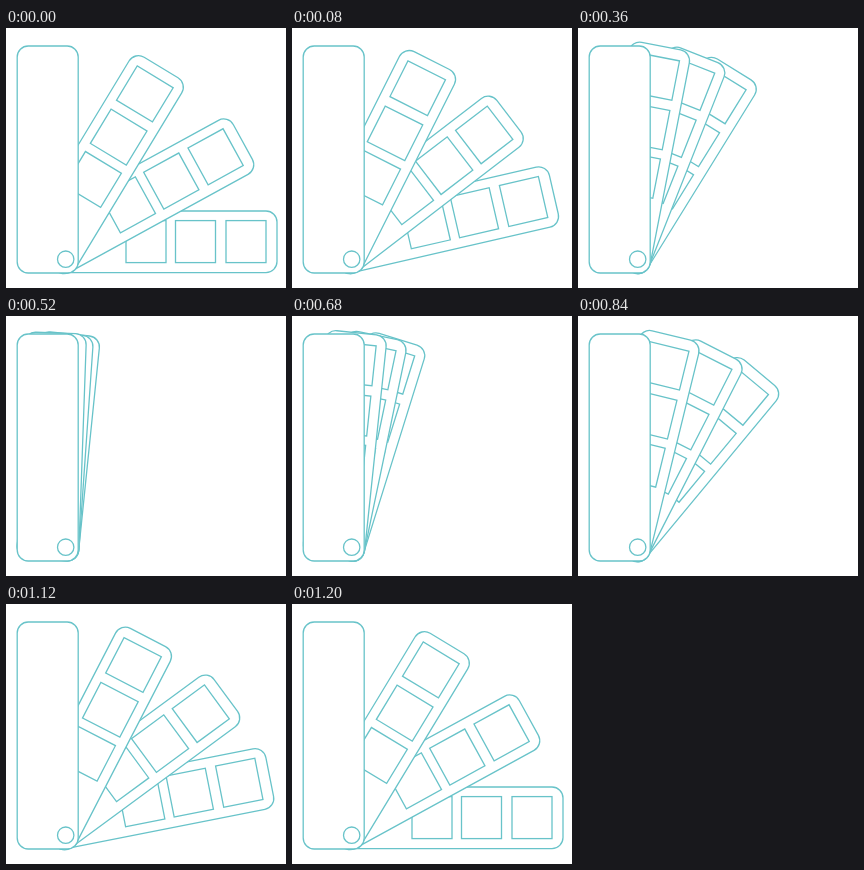
Write an HTML page that moves like this. It is 280x260 px and loops after 1240 ms.

```html
<!DOCTYPE html>
<html lang="en">
<head>
<meta charset="utf-8">
<title>Swatch fan</title>
<style>
  html, body { margin: 0; height: 100%; overflow: hidden; background: #fff; }
  svg { display: block; }
</style>
</head>
<body>
<svg width="280" height="260" viewBox="0 0 280 260" fill="#fff" stroke="#68c3c9" stroke-width="1.3">
  <defs>
    <!-- Card with its pivot at the origin -->
    <g id="card">
      <rect x="-47.6" y="-212" width="61.6" height="226" rx="11"/>
      <rect x="-38" y="-201" width="42" height="40"/>
      <rect x="-38" y="-150.5" width="42" height="40"/>
      <rect x="-38" y="-101" width="42" height="40"/>
    </g>
  </defs>
  <use class="blade" href="#card" data-open="90"/>
  <use class="blade" href="#card" data-open="61.3"/>
  <use class="blade" href="#card" y="-1.2" data-open="31.2"/>
  <rect x="11.2" y="18" width="61" height="227" rx="11"/>
  <circle cx="59.7" cy="231.2" r="8.2"/>
</svg>
<script>
  const LOOP = 1240, STEP = 40, CLOSED = 556, OPENED = 1200;
  const blades = document.querySelectorAll('.blade');

  // 1 = fully open, 0 = folded behind the front card
  function spread(t) {
    return t < CLOSED ? 1 - t / CLOSED : (t - CLOSED) / (OPENED - CLOSED);
  }

  function draw(now) {
    const t = Math.floor((now % LOOP) / STEP) * STEP;
    for (const blade of blades) {
      const angle = blade.dataset.open * spread(t);
      blade.setAttribute('transform', `translate(59 230.6) rotate(${angle})`);
    }
  }

  const start = performance.now();
  function tick() {
    draw(performance.now() - start);
    requestAnimationFrame(tick);
  }
  tick();
</script>
</body>
</html>
```
